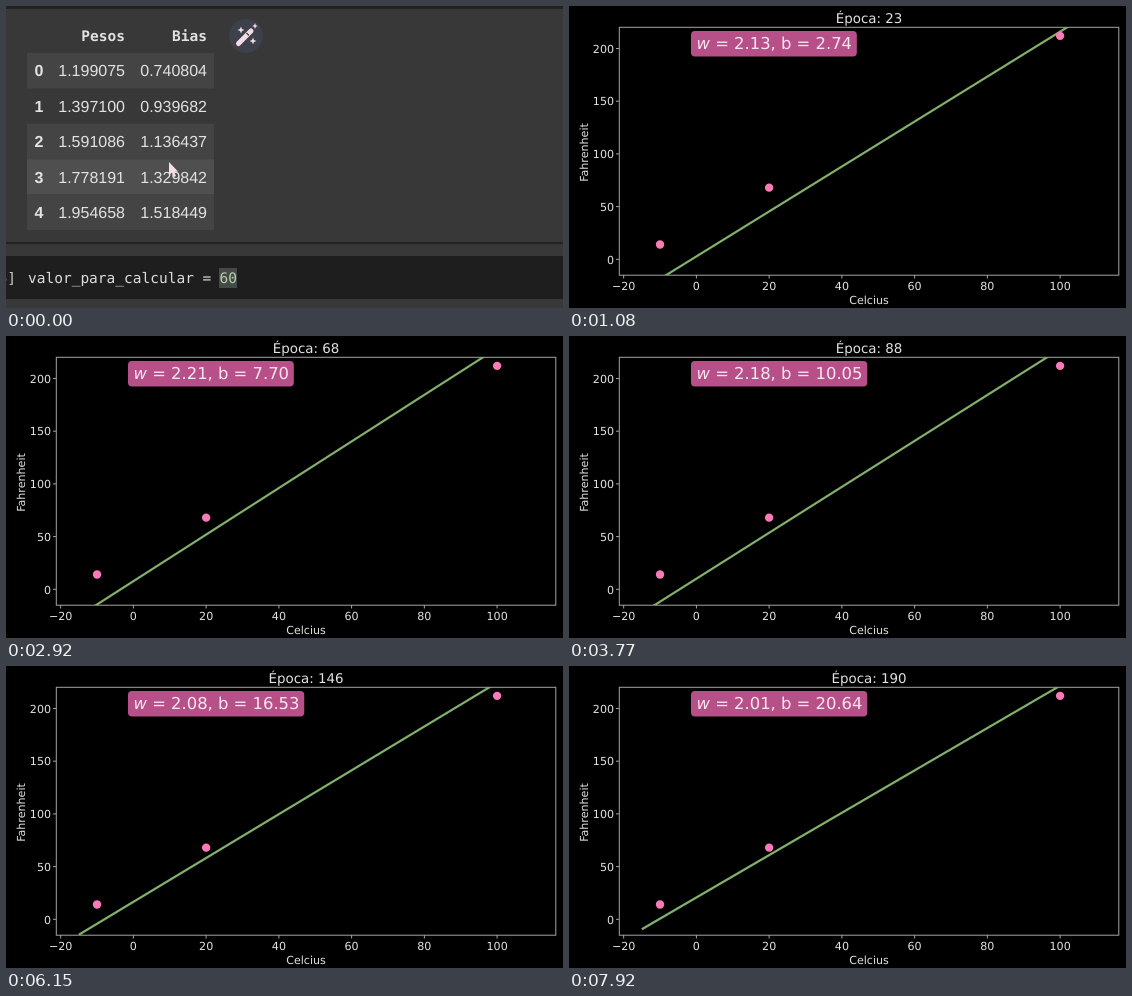
Recreate the animation shown at these times as an HTML page with a canvas. Size 557 by 302 pixels, loop 8 s.

```html
<!DOCTYPE html>
<html lang="es">
<head>
<meta charset="utf-8">
<style>
html, body { margin: 0; width: 100%; height: 100%; overflow: hidden; background: #000; }
canvas { display: block; }
</style>
</head>
<body>
<canvas id="stage" width="557" height="302"></canvas>
<script>
const ctx = document.getElementById('stage').getContext('2d');
ctx.textRendering = 'geometricPrecision';
ctx.fontKerning = 'normal';

const LOOP = 8000, FPS = 13, TABLE_FRAMES = 2;
const SANS = '"DejaVu Sans", sans-serif';
const MONO = '"DejaVu Sans Mono", monospace';
const ARIAL = '"Liberation Sans", Arial, sans-serif';
const INK = '#e2e2e2', AXIS = '#a4a4a4';

// [epoch, weight, bias]
const TRAINING = [
  [0, 1, 0], [4, 1.78, .79], [8, 2.37, 1.48], [10, 2.52, 1.75], [12, 2.55, 1.95],
  [14, 2.5, 2.1], [17, 2.34, 2.28], [22, 2.14, 2.65], [26, 2.11, 3], [32, 2.13, 3.55],
  [38, 2.18, 4.17], [52, 2.22, 5.8], [68, 2.21, 7.7], [113, 2.14, 12.98],
  [146, 2.08, 16.53], [190, 2.01, 20.64], [192, 2.006, 20.82]
];
const POINTS = [[-10, 14], [20, 68], [100, 212]];
const ROWS = [
  ['1.199075', '0.740804'], ['1.397100', '0.939682'], ['1.591086', '1.136437'],
  ['1.778191', '1.329842'], ['1.954658', '1.518449']
];

const px = x => 127.4 + x * 3.637;
const py = y => 253.3 - y * 1.054;

function rect(x, y, w, h, color, radius = 0) {
  ctx.fillStyle = color;
  ctx.beginPath();
  ctx.roundRect(x, y, w, h, radius);
  ctx.fill();
}

function dot(x, y, r, color) {
  ctx.fillStyle = color;
  ctx.beginPath();
  ctx.arc(x, y, r, 0, Math.PI * 2);
  ctx.fill();
}

function line(x1, y1, x2, y2, color, width) {
  ctx.strokeStyle = color;
  ctx.lineWidth = width;
  ctx.beginPath();
  ctx.moveTo(x1, y1);
  ctx.lineTo(x2, y2);
  ctx.stroke();
}

function text(str, x, y, font, color = INK, align = 'left') {
  ctx.font = font;
  ctx.fillStyle = color;
  ctx.textAlign = align;
  ctx.fillText(str, x, y);
}

function sparkle(x, y, r) {
  ctx.fillStyle = '#f3dbe6';
  ctx.beginPath();
  for (let i = 0; i < 8; i++) {
    const a = i * Math.PI / 4, d = i % 2 ? r * .4 : r;
    ctx.lineTo(x + d * Math.cos(a), y + d * Math.sin(a));
  }
  ctx.fill();
}

function drawWand() {
  dot(240, 30, 17, '#3c414b');
  ctx.lineCap = 'round';
  line(232.5, 37.5, 245, 25, '#f3dbe6', 5);
  ctx.lineCap = 'butt';
  line(240.5, 27, 243, 29.5, '#3c414b', 1.3);
  sparkle(235, 24, 3.5);
  sparkle(249, 20, 3);
  sparkle(247, 35, 3.5);
}

function drawCursor() {
  ctx.fillStyle = '#f4dfe8';
  ctx.beginPath();
  for (const [x, y] of [[163, 156], [163, 169], [166, 166.5], [168, 171], [170, 170], [168, 166], [172, 165.5]])
    ctx.lineTo(x, y);
  ctx.fill();
}

function drawTable() {
  const code = `14.5px ${MONO}`;
  rect(0, 0, 557, 302, '#383838');
  rect(0, 0, 557, 3, '#222');
  text('Pesos', 119, 35, `bold 14.5px ${MONO}`, INK, 'right');
  text('Bias', 201, 35, `bold 14.5px ${MONO}`, INK, 'right');
  ROWS.forEach(([weight, bias], i) => {
    const top = 47 + i * 35.4, base = top + 23.3;
    if (i !== 1) rect(21, top, 187, 35.4, i === 3 ? '#4f4f4f' : '#444');
    text(i, 33, base, `bold 16px ${ARIAL}`, INK, 'center');
    text(weight, 119, base, `16px ${ARIAL}`, INK, 'right');
    text(bias, 201, base, `16px ${ARIAL}`, INK, 'right');
  });
  drawWand();
  drawCursor();
  rect(0, 236, 557, 2, '#232323');
  rect(0, 250, 557, 43, '#1e1e1e');
  rect(213, 262, 18, 20, '#454a48');
  text('6]', 10, 277, code, '#ccc', 'right');
  text('valor_para_calcular = ', 22, 277, code, '#dcdcdc');
  text('60', 213.5, 277, code, '#b5cea8');
}

function modelAt(epoch) {
  const i = TRAINING.findIndex(k => k[0] > epoch);
  const [e0, w0, b0] = TRAINING[i - 1], [e1, w1, b1] = TRAINING[i];
  const f = (epoch - e0) / (e1 - e0);
  return [w0 + (w1 - w0) * f, b0 + (b1 - b0) * f];
}

function drawAxes() {
  const small = `11.1px ${SANS}`;
  ctx.strokeStyle = AXIS;
  ctx.lineWidth = 1;
  ctx.strokeRect(50.3, 21.3, 499.5, 247.9);
  for (let x = -20; x <= 100; x += 20) {
    line(px(x), 269, px(x), 272.5, AXIS, 1);
    text(String(x).replace('-', '−'), px(x), 283.6, small, INK, 'center');
  }
  for (let y = 0; y <= 200; y += 50) {
    line(47, py(y), 50, py(y), AXIS, 1);
    text(y, 45, py(y) + 4.2, small, INK, 'right');
  }
  text('Celcius', 300, 298, small, INK, 'center');
  ctx.save();
  ctx.translate(19, 146.5);
  ctx.rotate(-Math.PI / 2);
  text('Fahrenheit', 0, 0, small, INK, 'center');
  ctx.restore();
}

function drawPlot(epoch) {
  const [w, b] = modelAt(epoch);
  rect(0, 0, 557, 302, '#000');
  drawAxes();
  text(`Época: ${epoch}`, 300, 17, `13.4px ${SANS}`, INK, 'center');

  ctx.save();
  ctx.beginPath();
  ctx.rect(50, 21, 500, 248);
  ctx.clip();
  line(px(-15), py(b - 15 * w), px(115), py(b + 115 * w), '#82b06c', 2.2);
  ctx.restore();
  for (const [x, y] of POINTS) dot(px(x), py(y), 4.2, '#fa7ab8');

  const font = `16.4px ${SANS}`, left = 127.5, labelX = left + 16.4 * .818;
  const label = ` = ${w.toFixed(2)}, b = ${b.toFixed(2)}`;
  ctx.font = font;
  rect(122, 25, labelX + ctx.measureText(label).width + 4.8 - 122, 25.5, '#b75088', 4);
  text('w', left, 43, `italic ${font}`, '#f6e6ef');
  text(label, labelX, 43, font, '#f6e6ef');
}

function render(now) {
  const frame = Math.floor((now % LOOP + 5) * FPS / 1000);
  if (frame < TABLE_FRAMES) drawTable();
  else drawPlot(Math.floor(frame * 1.875 - 3.05));
  requestAnimationFrame(render);
}
requestAnimationFrame(render);
</script>
</body>
</html>
```
